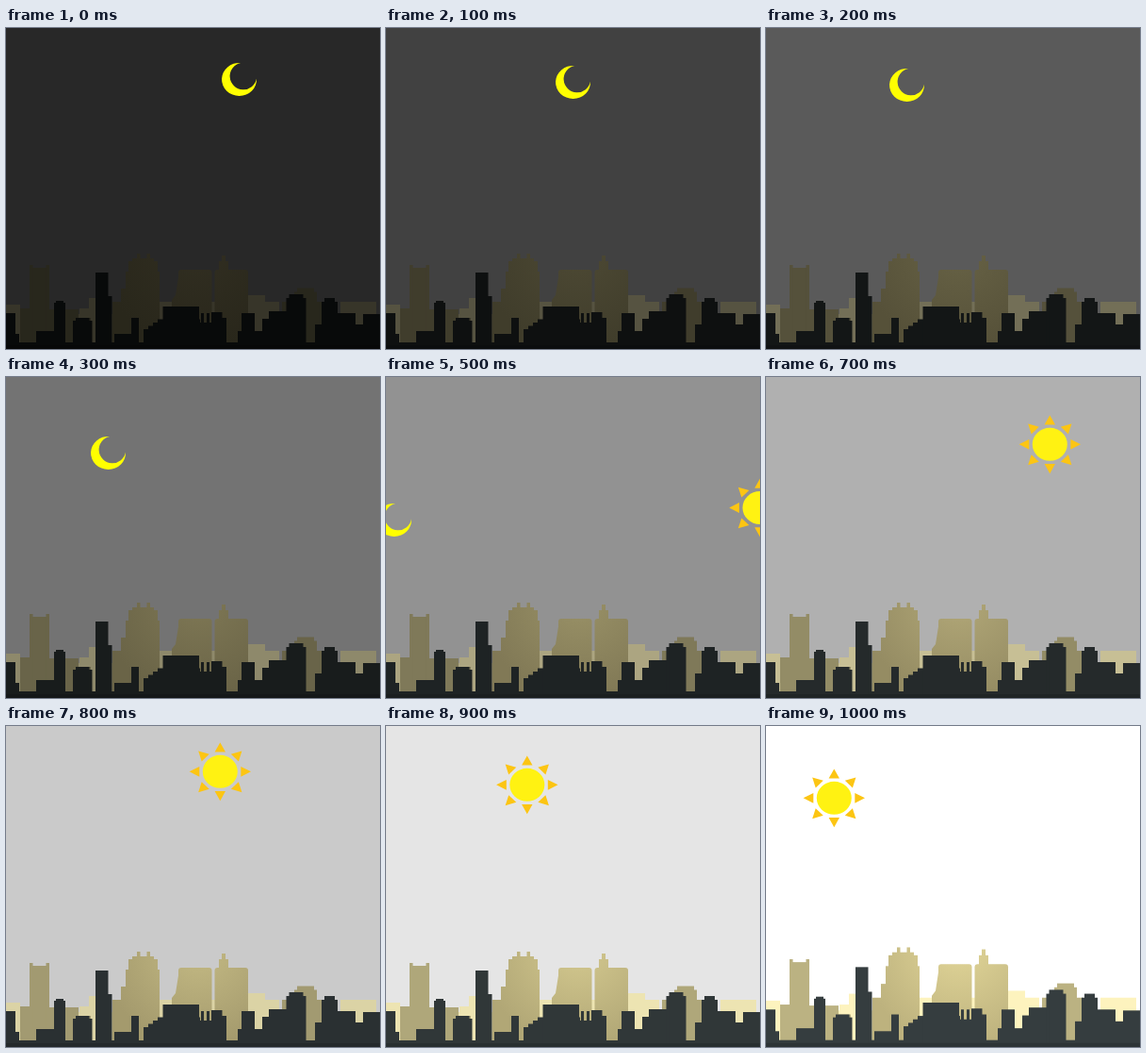
Recreate the animation shown at these times as an HTML page with a canvas. Size 397x340 px, loop 1.1 s.

```html
<!DOCTYPE html>
<html lang="en">
<head>
<meta charset="utf-8">
<title>Night to day skyline</title>
<style>
html, body { margin: 0; width: 100%; height: 100%; overflow: hidden; background: #fff; }
canvas { display: block; }
</style>
</head>
<body>
<canvas id="stage" width="397" height="340"></canvas>
<script>
const W = 397, H = 340, STEP = 100, STEPS = 11;
const ctx = document.getElementById('stage').getContext('2d');

// Key points: step, then the values to blend between.
const skyKeys = [[0, 40], [3, 115], [7, 176], [10, 255]];
const moonKeys = [[0, 247.5, 54.5], [2, 149.5, 60.5], [3, 108.5, 80.5], [5, 8.5, 151.5]];
const sunKeys = [[5, 397, 138.5], [7, 301.3, 71.3], [8, 227.3, 48.3], [10, 72.3, 76.3]];

function at(keys, t) {
  const n = Math.max(1, keys.findIndex(key => key[0] >= t));
  const [t0, ...a] = keys[n - 1], [t1, ...b] = keys[n];
  return a.map((v, j) => v + (b[j] - v) * (t - t0) / (t1 - t0));
}

const shade = (light, ...rgb) => `rgb(${rgb.map(v => Math.round(v * light))})`;

// A building whose roof narrows upwards in tiers.
function block(x, w, top, tiers = 0, inset = 3, rise = 4) {
  for (let i = 0; i <= tiers; i++) {
    const y = top - i * rise;
    ctx.fillRect(x + i * inset, y, w - 2 * i * inset, H - y);
  }
}

// Two small posts at the ends of a roof.
function horns(x, w, top) {
  block(x, 3.5, top);
  block(x + w - 3.5, 3.5, top);
}

function slab(x, w, top) {
  ctx.beginPath();
  ctx.roundRect(x, top, w, H - top, 3);
  ctx.fill();
}

function backRow(light) {
  ctx.fillStyle = shade(light, 253, 243, 190);
  block(0, W, 303);
  block(0, 15, 293);
  block(78, 18, 297);
  block(88, 8, 286);
  block(163, 127, 290);
  block(257, 18, 283);
  block(355, 38, 290);
}

function middleRow(light) {
  ctx.fillStyle = shade(light, 187, 178, 130);
  block(15, 31, 297);
  block(25, 21, 254);
  horns(25, 21, 251);
  block(46, 31, 298);
  block(77, 13, 307);
  block(293, 44, 290);
  block(306, 24, 279.5, 1);

  const glow = ctx.createRadialGradient(205, 235, 0, 205, 235, 105);
  glow.addColorStop(0, shade(light, 226, 214, 152));
  glow.addColorStop(1, shade(light, 189, 178, 126));
  ctx.fillStyle = glow;
  block(113, 50, 290);
  block(122, 41, 276);
  block(127, 36, 258);
  block(130, 31, 247, 1, 4, 3);
  horns(139, 14, 239);
  ctx.fill(new Path2D('M176 340V288L180 283L184 258H200V340Z'));
  slab(183, 35.5, 256);
  slab(221.5, 35.5, 256);
  block(226, 10, 247, 1, 3, 6);
}

function frontRow(light) {
  ctx.fillStyle = shade(light, 53, 61, 63);
  block(0, W, 333);
  block(0, 10, 302);
  block(10, 4, 324);
  block(32, 31, 321);
  block(51, 12, 291, 1, 2, 2);
  block(71, 20.5, 310, 1, 3, 3);
  block(95, 17.5, 284);
  block(95, 13.5, 259);
  block(115, 18, 324);
  block(133, 8, 307);
  for (let i = 0; i < 4; i++) block(146 + 5 * i, 60 - 5 * i, 319 - 3.5 * i);
  block(166.5, 38.5, 295);
  block(205, 29, 312);
  for (let x = 207; x < 216; x += 6) block(x, 3, 302);
  block(218, 11.5, 301);
  block(229, 5, 307);
  block(246, 72, 321);
  block(250, 14, 302);
  block(272, 46, 308);
  block(279, 39, 300);
  block(297.5, 21, 286, 1);
  block(328, W, 314);
  block(335, 17, 290, 1);
  block(352, 19, 302);
  block(379, 18, 303);
  ctx.fillStyle = shade(light, 45, 52, 54);
  ctx.fillRect(0, 336, W, 4);
}

function shape(d, color) {
  ctx.fillStyle = color;
  ctx.fill(new Path2D(d));
}

function moon() {
  shape('M1.5 -17.5A18.5 17.5 0 1 0 18.5 -1A14.3 14.3 0 1 1 1.5 -17.5Z', '#ff0');
}

function sun() {
  ctx.scale(1, .945);
  shape('M18.5 0A18.5 18.5 0 1 1 -18.5 0A18.5 18.5 0 1 1 18.5 0Z', '#fff212');
  for (let i = 0; i < 8; i++) {
    shape('M32.7 0L22 -5.7V5.7Z', '#fcc513');
    ctx.rotate(Math.PI / 4);
  }
}

function place(drawShape, x, y, scaleY = 1) {
  ctx.save();
  ctx.translate(x, y);
  ctx.scale(1, scaleY);
  drawShape();
  ctx.restore();
}

function city(light) {
  ctx.translate(0, -H);
  // Distant buildings fade more slowly than the sky.
  const haze = light * (1.45 - .45 * light);
  backRow(haze);
  middleRow(haze);
  frontRow(light);
}

function draw(now) {
  const t = Math.floor(now / STEP) % STEPS;
  const light = at(skyKeys, t)[0] / 255;
  ctx.fillStyle = shade(light, 255, 255, 255);
  ctx.fillRect(0, 0, W, H);
  // The skyline jumps slightly taller in full daylight.
  place(() => city(light), 0, H, light < 1 ? 1 : 1.045);
  if (t <= 5) place(moon, ...at(moonKeys, t));
  if (t >= 5) place(sun, ...at(sunKeys, t));
}

const start = performance.now();
function tick() {
  draw(performance.now() - start);
  requestAnimationFrame(tick);
}
tick();
</script>
</body>
</html>
```
